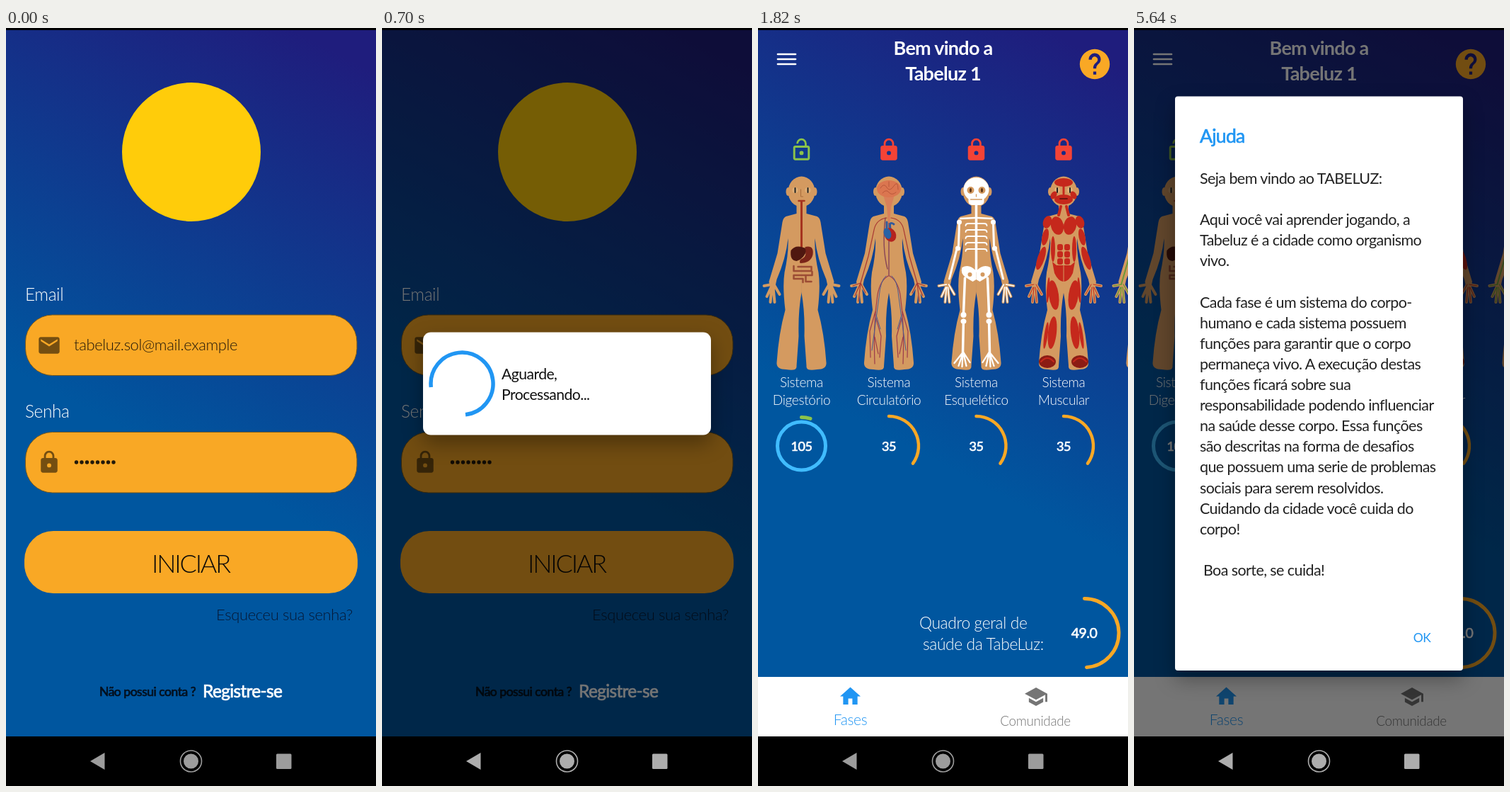
Recreate the animation shown at these times as an HTML page. Size 523 px wide and 1070 px high, loop 8000 ms.

```html
<!DOCTYPE html>
<html lang="pt">
<head>
<meta charset="utf-8">
<style>
html, body { margin: 0; width: 100%; height: 100%; overflow: hidden; background: #000; }
svg { display: block; width: 100%; height: 100%; }
text { font-family: Lato, "Open Sans", sans-serif; letter-spacing: -.027em; white-space: pre; }
#login text, #home text { font-weight: 300; letter-spacing: -.017em; }
#login .semi, #home .semi { font-weight: 400; letter-spacing: -.027em; }
#home .title { font-weight: 700; letter-spacing: -.027em; }
.semi { stroke: currentColor; stroke-width: .7; }
.line { fill: none; stroke-linecap: round; stroke-linejoin: round; }
.card { fill: #fff; filter: drop-shadow(0 12px 14px #0005); }
</style>
</head>
<body>
<svg id="stage" viewBox="0 0 523 1070"></svg>
<script>
const ORANGE = '#f9a825', BLUE = '#2196f3', SKIN = '#d49a60', RED = '#c5281c';

const ICONS = {
  mail: 'M20 4H4c-1.1 0-2 .9-2 2v12c0 1.1.9 2 2 2h16c1.1 0 2-.9 2-2V6c0-1.1-.9-2-2-2zm0 4l-8 5-8-5V6l8 5 8-5v2z',
  lock: 'M18 8h-1V6c0-2.8-2.2-5-5-5S7 3.2 7 6v2H6c-1.1 0-2 .9-2 2v10c0 1.1.9 2 2 2h12c1.1 0 2-.9 2-2V10c0-1.1-.9-2-2-2zm-6 9a2 2 0 1 1 0-4 2 2 0 0 1 0 4zm3.1-9H8.9V6a3.1 3.1 0 0 1 6.2 0z',
  open: 'M12 17a2 2 0 1 0 0-4 2 2 0 0 0 0 4zm6-9h-1V6A5 5 0 0 0 7 6h1.9a3.1 3.1 0 0 1 6.2 0v2H6c-1.1 0-2 .9-2 2v10c0 1.1.9 2 2 2h12c1.1 0 2-.9 2-2V10c0-1.1-.9-2-2-2zm0 12H6V10h12z',
  house: 'M10 20v-6h4v6h5v-8h3L12 3 2 12h3v8z',
  school: 'M5 13.2v4L12 21l7-3.8v-4L12 17zM12 3L1 9l11 6 9-4.9V17h2V9z',
  help: 'M12 2a10 10 0 1 0 0 20 10 10 0 0 0 0-20zm1 17h-2v-2h2zm2.1-7.75l-.9.92C13.45 12.9 13 13.5 13 15h-2v-.5c0-1.1.45-2.1 1.17-2.83l1.24-1.26A2 2 0 1 0 10 9H8a4 4 0 1 1 7.1 2.25z'
};

// Drawing helpers
const icon = (name, x, y, fill, k = 1.47) =>
  `<path d="${ICONS[name]}" fill="${fill}" transform="translate(${x} ${y}) scale(${k}) translate(-12 -12)"/>`;
const text = (s, x, y, size, fill = '#fff', anchor = 'start', more = '') =>
  `<text x="${x}" y="${y}" font-size="${size}" fill="${fill}" color="${fill}" text-anchor="${anchor}" ${more}>${s}</text>`;
const semi = (s, x, y, size, fill, anchor) => text(s, x, y, size, fill, anchor, 'class="semi"');
const line = (d, color, w) => `<path class="line" d="${d}" stroke="${color}" stroke-width="${w}"/>`;
const oval = (x, y, rx, ry, fill, turn = 0) =>
  `<ellipse cx="${x}" cy="${y}" rx="${rx}" ry="${ry}" fill="${fill}" transform="rotate(${turn} ${x} ${y})"/>`;
const shape = (d, fill) => `<path d="${d}" fill="${fill}"/>`;
const rect = (x, y, w, h, r, more) => `<rect x="${x}" y="${y}" width="${w}" height="${h}" rx="${r}" ${more}/>`;
const both = s => s + `<g transform="scale(-1 1)">${s}</g>`;
const group = (id, s) => `<g id="${id}">${s}</g>`;

function gauge(x, y, r, percent, color, w) {
  const a = percent * Math.PI / 50;
  return line(`M${x} ${y - r}A${r} ${r} 0 0 1 ${x + r * Math.sin(a)} ${y - r * Math.cos(a)}`, color, w);
}

// Figures, drawn around x = 0
const FINGERS = 'M-42 362L-53 364M-43 366L-49 379M-42 366L-44 387M-40 366L-38 387M-39 362L-31 376';
const body = oval(0, 231, 19, 21.5, SKIN) + both(
  oval(-19, 231, 3, 6, SKIN) +
  shape('M.3 248H-7V262L-22 266Q-26 268-27 274L-34 318-46 358Q-45 370-38 369L-35 355Q-22 325-19 297Q-18 318-24 345Q-27 365-23 398Q-32 430-35 472Q-36 482-22 482Q-6 485-7 477L-4 435Q-5 400 .3 372Z', SKIN) +
  line(FINGERS, SKIN, 4));
const eyes = both(oval(-9, 229, 4, 4, '#e0b078') + line('M-9 226V232', '#222', 2));

const digestive = eyes + line('M-1 228V238H2', '#a86d3c', 1) + line('M-4 244H4', '#a5341f', 2.5) +
  line('M0 245V311', '#a5341f', 3) +
  shape('M-15 314Q-8 304 8 312Q4 326-7 329Q-17 328-15 314', '#4f1710') +
  shape('M5 309Q18 306 16 320Q13 332-2 332Q-4 327 2 325Q8 322 5 309', '#7a2418') +
  line('M-11 336V343H14V337H-5M-11 349H15V344M-11 349V354H2V359M6 349V358H14', '#9c4c34', 2.5);

const vessels = both(
  line('M-3 268Q-18 270-21 285L-29 322-40 360M-40 360L-51 364M-40 360L-48 378M-40 360L-43 386M-40 360L-33 374', '#a83632', 1.2) +
  line('M-1 350Q-15 358-17 385Q-22 420-20 474M-19 400L-27 428-26 465M-18 410L-11 435-13 465M-20 436L-15 460', '#9c3b4b', 1.2) +
  line('M-4 350Q-12 356-14 380L-20 425-24 455M-18 405L-12 425', '#4a5c92', 1));
const circulatory = line('M0 255V350M-5 268Q-10 310-2 340', '#8c4a58', 1.5) + vessels +
  shape('M-8 235H8Q5 247 3 252L1 275H-1L-3 252Q-5 247-8 235', '#d9805a') +
  oval(0, 227, 17, 12, '#db7650') +
  line('M-12 226Q-7 218-3 225T7 223 13 228M-9 233Q-4 227 0 232T10 232M0 217V224', '#b9573a', 1) +
  line('M2 283Q0 272 7 277M-3 282V274', '#315a9c', 3) +
  oval(2, 292, 8, 10, '#b5231f', -25) + oval(-2, 290, 5, 8, '#2862a5', -20);

const ribs = [276, 285, 294, 303, 312].map(y => line(`M0 ${y}H-11Q-15 ${y}-15 ${y + 3}`, '#fff', 1.8)).join('');
const skeletal = oval(0, 228, 18, 17, '#fff') + rect(-11, 236, 22, 14, 5, 'fill="#fff"') +
  both(oval(-8, 229, 5, 5, SKIN) + oval(-8, 229, 1.5, 3, '#5a3518')) +
  line('M-8 242H8M0 235V238', SKIN, 1.3) + line('M0 250V343', '#fff', 3.5) + both(
    ribs + line('M-2 268L-22 269', '#fff', 2.5) + line('M-24 276L-25 307M-28 314L-38 354', '#fff', 3) +
    oval(-24, 274, 3.5, 3.5, '#fff') + oval(-26, 311, 3.5, 3.5, '#fff') + line(FINGERS, '#fff', 1.6) +
    shape('M0 343Q-10 332-20 338Q-23 346-15 352L-5 358 0 355Z', '#fff') + oval(-9, 348, 3, 3, SKIN) +
    line('M-16 353L-18 402M-18 412L-19 458', '#fff', 3.5) + oval(-18, 405, 4, 4, '#fff') + oval(-18, 414, 4, 3.5, '#fff') +
    line('M-19 458L-31 473M-19 459L-25 477M-19 459L-20 478M-18 459L-14 477M-18 458L-9 472', '#fff', 2.3));

const abs = [305, 315, 325].map(y => rect(-9, y, 8, 9, 3, `fill="${RED}"`)).join('');
const muscular = oval(0, 218, 13, 6, RED) + eyes + oval(0, 242, 13, 7, RED) +
  line('M-5 241H5', '#6f160f', 2) + line('M0 223V234', RED, 3) + both(
    oval(-14, 236, 4, 6, RED, 30) + line('M-4 252L-7 264', RED, 4) +
    oval(-23, 274, 6, 9, RED, 20) + oval(-9, 279, 9, 13, RED, -12) +
    oval(-26, 295, 4.5, 12, RED, 12) + oval(-32, 325, 5, 17, RED, 18) + line(FINGERS, RED, 1) +
    oval(-15, 312, 3, 18, RED) + abs + shape('M-.5 335H-10L-16 330-13 346Q-8 357-.5 358Z', RED) +
    oval(-14, 377, 7, 21, RED, -8) + oval(-22, 370, 2, 18, RED, 4) +
    oval(-16, 430, 6, 23, RED, 6) + oval(-25, 434, 2.5, 19, RED, 8) +
    oval(-23, 471, 12, 9, '#8c1c14') + line('M-32 471Q-23 461-14 471', RED, 2));

const nervous = both(line(FINGERS, '#6c9a3a', 1.4) + line('M-30 320L-42 362M-24 400Q-32 430-31 470', '#6c9a3a', 2));

const figures = [
  [61.5, digestive, 'Digestório'], [185, circulatory, 'Circulatório'],
  [308.5, skeletal, 'Esquelético'], [432, muscular, 'Muscular'], [555.5, nervous, '']
];

// Screens
const login =
  '<circle cx="262" cy="175" r="98" fill="#ffcc0a"/>' +
  text('Email', 27, 385, 24.5) + text('Senha', 27, 550, 24.5) +
  [405, 570.5].map(y => rect(27.5, y, 468.5, 85.5, 38, `fill="${ORANGE}" stroke="#75591f"`)).join('') +
  icon('mail', 61, 448, '#0008') + icon('lock', 61, 613, '#0008') +
  text('tabeluz.sol@mail.example', 96, 455, 22, '#22190a') +
  Array.from({ length: 8 }, (_, i) => oval(99.5 + 7.5 * i, 613, 2.7, 2.7, '#22190a')).join('') +
  rect(26, 710, 471, 88, 41, `fill="${ORANGE}"`) +
  text('INICIAR', 261, 769, 36, '#0d0b08', 'middle', 'style="letter-spacing:-.06em"') +
  text('Esqueceu sua senha?', 490, 836, 22, '#061936', 'end') +
  semi('Não possui conta ?', 132, 943, 17.5, '#03101f') +
  semi('Registre-se', 278, 945, 24.5, '#fff');

const title = (s, y) => text(s, 261.5, y, 27, '#fff', 'middle', 'class="title"');
const home =
  line('M28 37H53M28 44H53M28 51H53', '#fff', 2.7) +
  title('Bem vindo a', 38) + title('Tabeluz 1', 74) +
  icon('help', 476, 51, ORANGE, 2.12) +
  figures.map(([x, organs, name], i) =>
    `<g transform="translate(${x} 0)">${body}${organs}</g>` + (name &&
      icon(i ? 'lock' : 'open', x, 172, i ? '#f44336' : '#8bc34a') +
      text('Sistema', x, 507, 19, '#fff', 'middle') + text(name, x, 532, 19, '#fff', 'middle') +
      semi(i ? 35 : 105, x, 597, 18, '#fff', 'middle') +
      (i ? gauge(x, 590, 42, 35, ORANGE, 4.5)
         : `<circle cx="${x}" cy="590" r="34" fill="none" stroke="#40bcff" stroke-width="5"/>` +
           gauge(x, 590, 40.5, 5, '#8bc34a', 5)))).join('') +
  text('Quadro geral de', 228, 848, 22.8) + text('saúde da TabeLuz:', 233, 878, 22.8) +
  gauge(461.5, 854, 48.5, 49, ORANGE, 5) + semi('49.0', 461, 861, 19.5, '#fff', 'middle') +
  rect(0, 916, 523, 84, 0, 'fill="#fff"') +
  icon('house', 130.5, 943.5, BLUE, 1.45) + text('Fases', 130.5, 984, 21, BLUE, 'middle') +
  icon('school', 393, 944, '#757575', 1.45) + text('Comunidade', 392, 985, 18.8, '#757575', 'middle');

const wait = rect(58, 429.5, 407, 145, 11, 'class="card"') +
  `<path d="M69.3 507A44 44 0 1 1 118 545.8" fill="none" stroke="${BLUE}" stroke-width="5.5"/>` +
  text('Aguarde,', 169, 496, 21.2, '#111') + text('Processando...', 169, 525, 21.2, '#111');

const advice = `Seja bem vindo ao TABELUZ:

Aqui você vai aprender jogando, a
Tabeluz é a cidade como organismo
vivo.

Cada fase é um sistema do corpo-
humano e cada sistema possuem
funções para garantir que o corpo
permaneça vivo. A execução destas
funções ficará sobre sua
responsabilidade podendo influenciar
na saúde desse corpo. Essa funções
são descritas na forma de desafios
que possuem uma serie de problemas
sociais para serem resolvidos.
Cuidando da cidade você cuida do
corpo!

 Boa sorte, se cuida!`;
const guide = rect(58, 96.5, 407, 810.5, 4, 'class="card"') +
  semi('Ajuda', 93, 162, 26.5, BLUE) +
  advice.split('\n').map((s, i) => text(s, 93, 220 + 29.1 * i, 21.5, '#222')).join('') +
  text('OK', 407, 867, 17.5, BLUE, 'middle');

const stage = document.getElementById('stage');
stage.innerHTML =
  `<defs><linearGradient id="sky" gradientUnits="userSpaceOnUse" x1="523" y1="4" x2="111" y2="788">
    <stop offset=".06" stop-color="#1f1d7d"/><stop offset=".75" stop-color="#00569f"/></linearGradient></defs>` +
  rect(0, 3, 523, 997, 0, 'fill="url(#sky)"') +
  group('login', login) + group('home', home) +
  group('scrim', rect(0, 0, 523, 1000, 0, 'fill="#000" fill-opacity=".54"')) +
  group('wait', wait) + group('guide', guide) +
  rect(0, 0, 523, 3, 0, '') + rect(0, 1000, 523, 70, 0, '') +
  group('keys', '<path d="M119 1035L139.5 1023V1047Z"/><circle cx="261.5" cy="1035" r="10.5"/>' +
    '<circle cx="261.5" cy="1035" r="15" fill="none" stroke="currentColor" stroke-width="1.6"/>' +
    rect(382, 1024.5, 21.5, 21.5, 1.5, ''));

const get = id => document.getElementById(id);
const show = (id, on) => get(id).setAttribute('display', on ? 'inline' : 'none');

function draw() {
  const t = performance.now() % 8000;
  const step = Math.min(3, Math.floor(t / 700));
  const dim = step % 2 === 1;
  show('login', step < 2);
  show('home', step > 1);
  show('scrim', dim);
  show('wait', step === 1);
  show('guide', step === 3);
  const tint = dim ? '#adadad' : '#9c9c9c';
  get('keys').setAttribute('fill', tint);
  get('keys').setAttribute('color', tint);
  requestAnimationFrame(draw);
}
draw();
</script>
</body>
</html>
```
